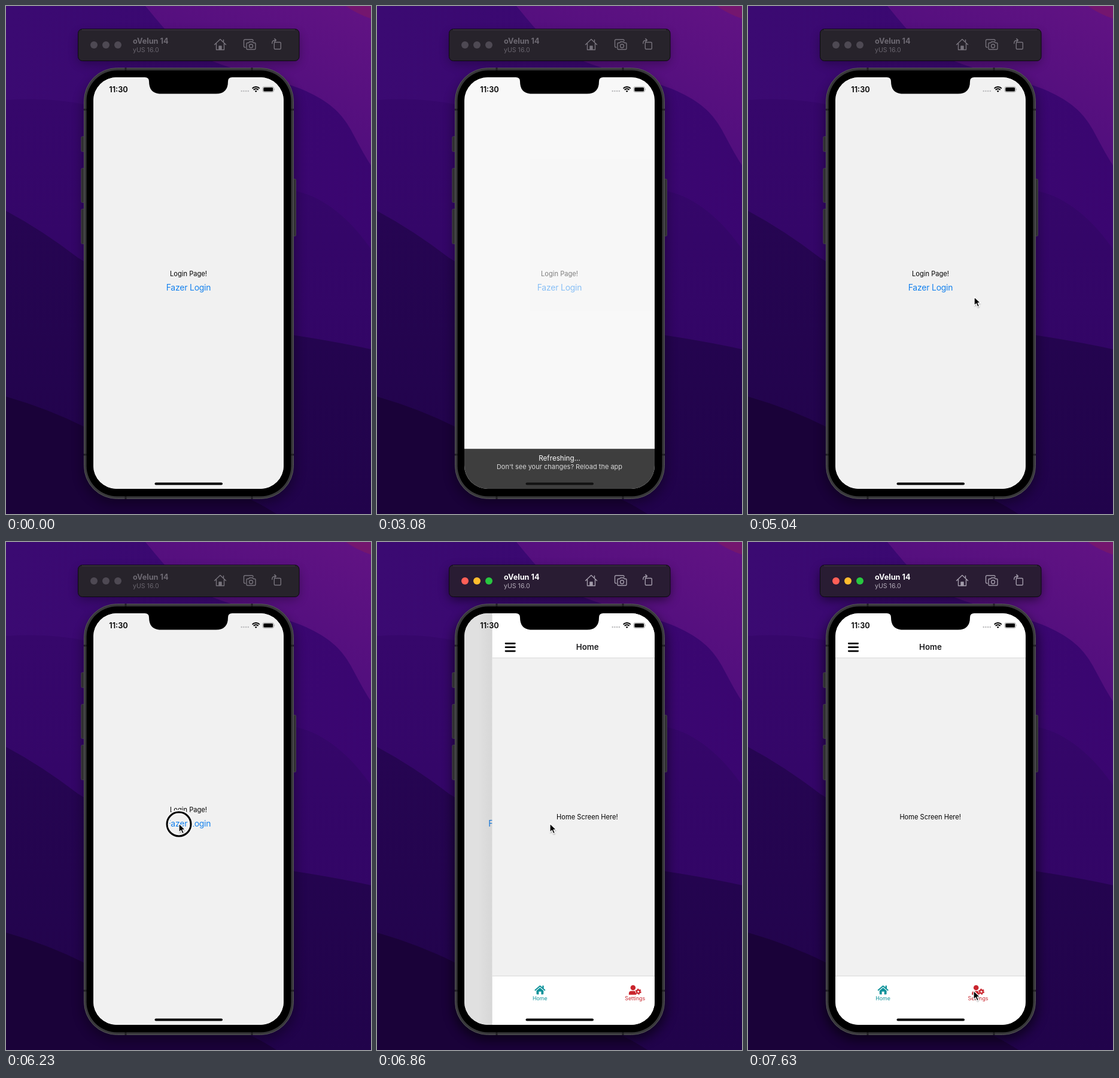
An HTML page for the animation above (8 s loop, 610 by 848 pixels).

```html
<!DOCTYPE html>
<html lang="pt">
<head>
<meta charset="utf-8">
<title>Login flow</title>
<style>
html, body { margin: 0; width: 100%; height: 100%; overflow: hidden; background: #250450; }
svg { display: block; width: 100vw; height: 100vh; font-family: Inter, Roboto, sans-serif; }
.mid { text-anchor: middle; }
.line { fill: none; stroke-linecap: round; stroke-linejoin: round; }
#bar { --bg: #27232b; --title: #6d6972; --sub: #69656e; --icon: #77737c; --d0: #4e4953; --d1: #4e4953; --d2: #4e4953; }
#bar.on { --bg: #291c33; --title: #fff; --sub: #b4adba; --icon: #a39cab; --d0: #ff5f57; --d1: #febc2e; --d2: #28c840; }
</style>
</head>
<body>
<svg viewBox="0 0 610 848">
  <defs>
    <linearGradient id="sky" x2="1" y2=".6">
      <stop offset="0" stop-color="#3b0a72"/><stop offset="1" stop-color="#3a0570"/>
    </linearGradient>
    <linearGradient id="glow" x1=".3" y1="1" x2="1" y2="0">
      <stop offset="0" stop-color="#480c79"/><stop offset="1" stop-color="#621384"/>
    </linearGradient>
    <linearGradient id="left" x2="0" y2="1">
      <stop offset="0" stop-color="#36076b"/><stop offset="1" stop-color="#300463"/>
    </linearGradient>
    <linearGradient id="low" x2="0" y2="1">
      <stop offset="0" stop-color="#260552"/><stop offset="1" stop-color="#21034b"/>
    </linearGradient>
    <linearGradient id="edge">
      <stop offset="0" stop-opacity="0"/><stop offset="1" stop-opacity=".04"/>
    </linearGradient>
    <filter id="blur" x="-20%" y="-20%" width="140%" height="140%"><feGaussianBlur stdDeviation="9"/></filter>
    <filter id="soft" x="-60%" y="-60%" width="220%" height="220%"><feGaussianBlur stdDeviation="1.2"/></filter>
    <clipPath id="glass"><rect x="146" y="119" width="318" height="687" rx="39"/></clipPath>
    <path id="arrow" d="M0 0V14.6L3.4 11.4 5.7 16.8 8.4 15.6 6.1 10.3H10.7Z"/>
  </defs>

  <!-- wallpaper -->
  <rect width="610" height="848" fill="url(#sky)"/>
  <path d="M233 0C262 34 280 62 325 84C390 112 440 118 492 138C540 158 560 178 576 206C588 228 598 248 610 266V0Z" fill="url(#glow)"/>
  <path d="M568 0Q588 14 610 21V0Z" fill="#74166f"/>
  <path d="M0 157Q70 152 135 165L310 260 484 309C530 318 576 356 610 406V848H0Z" fill="url(#left)"/>
  <path d="M0 342Q60 374 120 420C230 490 360 530 484 550Q550 560 610 573V848H0Z" fill="url(#low)"/>
  <path d="M0 652Q70 672 132 703C240 760 380 800 452 848H0Z" fill="#1a0239"/>

  <!-- window shadows -->
  <g id="shade" filter="url(#blur)">
    <rect x="121" y="46" width="368" height="50" rx="9"/>
    <rect x="127" y="112" width="358" height="720" rx="58"/>
  </g>

  <!-- simulator bar -->
  <g id="bar">
    <rect x="120.5" y="38.5" width="369.5" height="53" rx="7" fill="var(--bg)" stroke="#0c0910"/>
    <path d="M127 39.7H483" stroke="#fff" stroke-opacity=".14"/>
    <circle cx="147" cy="65" r="6" fill="var(--d0)"/>
    <circle cx="167" cy="65" r="6" fill="var(--d1)"/>
    <circle cx="187" cy="65" r="6" fill="var(--d2)"/>
    <text x="212" y="63" font-size="12.7" font-weight="700" fill="var(--title)">oVelun 14</text>
    <text x="212" y="77" font-size="10.6" fill="var(--sub)">yUS 16.0</text>
    <g class="line" stroke="var(--icon)" stroke-width="1.4">
      <path d="M348.5 64.5L358 55.5 367.5 64.5M351.5 62.5V73H364.5V62.5M363.5 60V56.5"/>
      <path d="M356 72.5V67H360V72.5Z" fill="var(--icon)"/>
      <path d="M400 69H399.5Q397.5 69 397.5 67V58Q397.5 56 399.5 56H411Q413 56 413 58"/>
      <path d="M403.5 61.5H405.5L407 59.8H412L413.5 61.5H415.5Q417 61.5 417 63V71Q417 72.5 415.5 72.5H403.5Q402 72.5 402 71V63Q402 61.5 403.5 61.5Z"/>
      <circle cx="409.5" cy="66.7" r="3"/>
      <rect x="448.3" y="60.5" width="11" height="11.5" rx="1.5"/>
      <path d="M444.7 62.5Q444.5 57 451 57M448.8 54.4L451.4 57 448.8 59.6"/>
    </g>
  </g>

  <!-- phone body -->
  <g fill="#2f2f31" stroke="#48484b" stroke-width=".8">
    <rect x="125.8" y="218" width="7" height="25" rx="1.5"/>
    <rect x="125.8" y="271" width="7" height="57" rx="1.5"/>
    <rect x="125.8" y="339" width="7" height="58" rx="1.5"/>
    <rect x="478" y="289" width="6.5" height="95" rx="1.5"/>
  </g>
  <rect x="130.5" y="103.5" width="350" height="719" rx="55" fill="#38383a" stroke="#565659"/>
  <path d="M130 173H135M476 173H481M130 749H135M476 749H481M200 103V108M411 103V108M200 818V823M411 818V823" stroke="#222224" stroke-width="3"/>
  <rect x="134.5" y="107.5" width="342" height="711" rx="51"/>

  <g clip-path="url(#glass)">
    <rect x="146" y="119" width="318" height="687" fill="#fff"/>

    <circle id="splash" cx="306" cy="462.5" r="38.5" fill="#e6e6ea"/>

    <g id="opening" font-weight="500" font-size="11.3">
      <g id="spinner" class="line" stroke="#444" stroke-width="2"></g>
      <text x="269" y="423" letter-spacing="-.22">Opening project...</text>
      <rect x="271" y="450.5" width="68" height="28" rx="1.5" fill="none" stroke="#6b6b6b"/>
      <text class="mid" x="305" y="468.5" fill="#555">Go back</text>
    </g>

    <g id="login">
      <rect x="146" y="119" width="420" height="687" fill="#f1f1f1"/>
      <text class="mid" x="305" y="451" font-size="11.1">Login Page!</text>
      <text class="mid" x="305" y="474.5" font-size="13.9" letter-spacing="-.18" fill="#1481ee">Fazer Login</text>
    </g>
    <rect id="dim" x="146" y="119" width="318" height="687"/>

    <g id="home">
      <rect x="122" y="119" width="24" height="687" fill="url(#edge)"/>
      <rect x="146" y="119" width="318" height="687" fill="#fff"/>
      <rect x="146" y="193" width="318" height="532" fill="#d9d9d9"/>
      <rect x="146" y="194" width="318" height="530" fill="#f1f1f1"/>
      <path class="line" d="M168.3 169.3H183.7M168.3 175.7H183.7M168.3 182.1H183.7" stroke="#000" stroke-width="2.7"/>
      <text class="mid" x="305" y="180" font-size="13.3" font-weight="600" fill="#1c1c1e">Home</text>
      <text class="mid" x="304.7" y="462.5" font-size="11.1">Home Screen Here!</text>
      <g fill="#0f939b">
        <path class="line" d="M217.8 748L225.7 741.2 233.6 748" stroke="#0f939b" stroke-width="2" style="fill:none"/>
        <path d="M229.6 740.5H232V745H229.6ZM219.8 749L225.7 744 231.6 749V754Q231.6 755.2 230.4 755.2H227.7V750.6H223.7V755.2H221Q219.8 755.2 219.8 754Z"/>
        <text class="mid" x="225.6" y="765" font-size="8.8">Home</text>
      </g>
      <g fill="#c9252d">
        <circle cx="381.2" cy="744" r="4.3"/>
        <path d="M374.2 755.8V753.6Q374.4 749.8 378.4 749.6H383.6Q385 749.7 385.2 751.4L386.8 755.8Z"/>
        <circle cx="390" cy="750.6" r="2.7" fill="none" stroke="#c9252d" stroke-width="2.1"/>
        <circle cx="390" cy="750.6" r="4.2" fill="none" stroke="#c9252d" stroke-width="1.7" stroke-dasharray="2.2 2.2"/>
        <text class="mid" x="384.5" y="765" font-size="8.8">Settings</text>
      </g>
    </g>

    <!-- status bar -->
    <text x="172.3" y="143.7" font-size="12.8" font-weight="600">11:30</text>
    <path class="line" d="M393.7 142H404.9" stroke="#bdbdbf" stroke-width="2.6" stroke-dasharray="0 3.7"/>
    <g fill="none" stroke="#000" stroke-width="2">
      <path d="M411.6 137.6A8.6 8.6 0 0 1 423.8 137.6M413.8 140A5.4 5.4 0 0 1 421.6 140"/>
      <path d="M417.7 144L415.8 142A2.8 2.8 0 0 1 419.6 142Z" fill="#000" stroke="none"/>
    </g>
    <rect x="429" y="134.8" width="18.4" height="8.8" rx="2.6" fill="none" stroke="#999" stroke-width=".9"/>
    <rect x="430.3" y="136" width="15.8" height="6.4" rx="1.5"/>
    <path d="M448.6 137.6Q450 139.2 448.6 140.8Z" fill="#999"/>
    <path d="M232 118V119Q239 119 239 126Q239 146.5 259 146.5H351Q371 146.5 371 126Q371 119 378 119V118Z"/>

    <rect id="grip" x="248.5" y="795.5" width="113.5" height="4" rx="2"/>
    <g id="banner" class="mid">
      <rect id="panel" x="146" y="739.2" width="318" height="200" fill-opacity=".75"/>
      <text x="305" y="759.2" font-size="11.7" fill="#fff">Refreshing...</text>
      <text id="hint" x="305" y="773.2" font-size="11" fill="#d8d8d8">Don't see your changes? Reload the app</text>
    </g>
  </g>

  <g id="ring" fill="none">
    <circle cx="289" cy="471" r="20" stroke="#f4f4f4" stroke-width="8"/>
    <circle cx="289" cy="471" r="20" stroke="#000" stroke-width="3"/>
  </g>
  <g id="cursor">
    <use href="#arrow" x=".4" y="1.8" opacity=".4" filter="url(#soft)"/>
    <use href="#arrow" stroke="#fff" stroke-width="1.3" stroke-linejoin="round"/>
  </g>
</svg>
<script>
const LOOP = 8000, STEP = 70, WIDTH = 318;
const $ = id => document.getElementById(id);
const clamp = x => Math.min(1, Math.max(0, x));
const lerp = (a, b, p) => a + (b - a) * p;
const ramp = (t, from, to) => clamp((t - from) / (to - from));
const easeInOut = p => p < .5 ? 2 * p * p : 1 - 2 * (1 - p) ** 2;
const easeOut = (p, k) => 1 - (1 - p) ** k;
const show = (id, on) => $(id).setAttribute('display', on ? 'inline' : 'none');
const move = (id, x, y) => $(id).setAttribute('transform', `translate(${x} ${y})`);
const fade = (id, o) => $(id).setAttribute('opacity', o);

// critically damped spring
const spring = s => s <= 0 ? 0 : 1 - (1 + 20 * s) * Math.exp(-20 * s);

$('spinner').innerHTML = Array.from({ length: 8 }, (_, i) =>
  `<path d="M254.5 414.3V411.3" opacity="${1 - .11 * ((14 - i) % 8)}" transform="rotate(${i * 45} 254.5 418.7)"/>`).join('');

function pointer(t) {
  if (t < 6930) {
    const p = ramp(t, 4830, 5460);
    return [lerp(564, 289, easeOut(p, 2.78)), lerp(646, 470, easeOut(p, 6))];
  }
  if (t < 7490) {
    const p = easeInOut(ramp(t, 6930, 7490));
    return [lerp(289, 366, p), lerp(470, 750, p)];
  }
  const p = easeOut(ramp(t, 7490, 7630), 1.3);
  return [lerp(366, 377, p), lerp(750, 749, p)];
}

function draw(t) {
  const push = t < 7400 ? spring((t - 6690) / 1000) : 1;
  const active = t >= 6300;

  $('bar').classList.toggle('on', active);
  fade('shade', active ? .55 : .32);

  show('opening', t >= 2100 && t < 2170);
  show('splash', t >= 2380 && t < 2800);

  show('login', (t < 490 || t >= 3080) && push < 1);
  fade('login', t >= 3080 && t < 3150 ? .5 : 1);
  move('login', -.3 * WIDTH * push, 0);
  fade('dim', .085 * push);
  show('home', push > 0);
  move('home', WIDTH * (1 - push), 0);

  show('banner', t >= 2800 && t < 4480);
  show('hint', t >= 3080);
  $('panel').setAttribute('height', t < 3080 ? 29.8 : 200);
  move('banner', 0, 122 * easeInOut(ramp(t, 4170, 4520)));
  const covered = t >= 3080 && t < 4480;
  $('grip').setAttribute('fill', covered ? '#444' : '#000');
  fade('grip', covered ? lerp(.999, 1, ramp(t, 4270, 4480)) : 1);

  show('ring', t >= 6230 && t < 6370);
  fade('ring', t < 6300 ? 1 : .5);
  show('cursor', t >= 4830);
  move('cursor', ...pointer(t));
}

const start = performance.now();
function tick() {
  const t = (performance.now() - start) % LOOP;
  draw(Math.floor(t / STEP) * STEP);
  requestAnimationFrame(tick);
}
draw(0);
tick();
</script>
</body>
</html>
```
